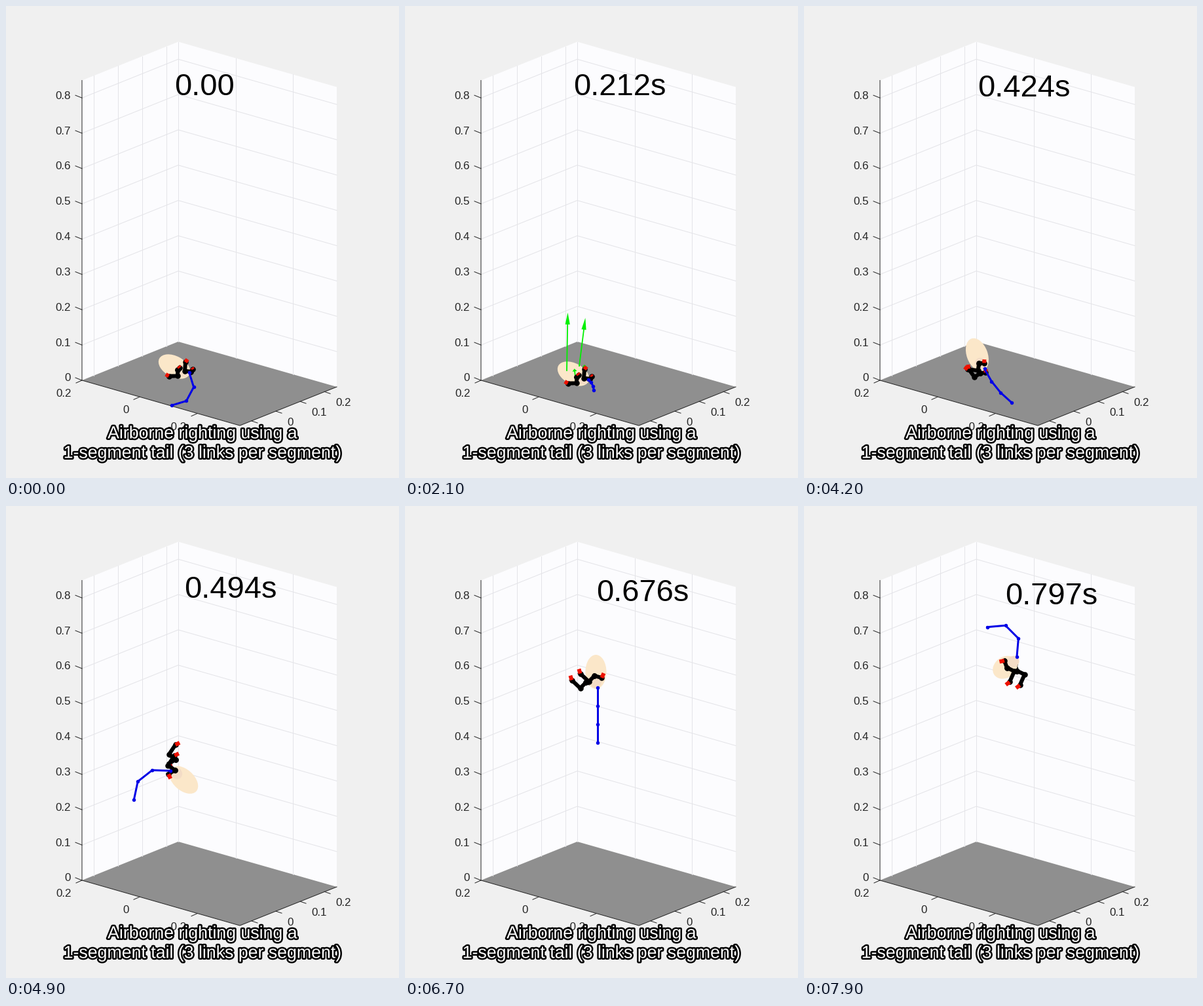
A matplotlib script for the animation above (8 s loop, 600 px wide and 720 px high).

```python
import numpy as np
import matplotlib.pyplot as plt
from matplotlib.animation import FuncAnimation
from matplotlib.patches import Ellipse, Polygon
from matplotlib.patheffects import withStroke

W, H, FRAMES, STEP = 600, 720, 80, 100
PX = 0.72  # points per pixel at 100 dpi
PAPER, WALL, FLOOR = "#f0f0f0", "#fcfcfe", "#8f8f8f"
GRID, INK = "#e4e4e8", "#262626"
TORSO, HIP = "#fbe7c9", "#f3dcc6"
BLUE, GREEN, RED = "#0000e6", "#00f000", "#ee1100"

plt.rcParams["font.family"] = "Liberation Sans"
plt.rcParams["text.kerning_factor"] = 6  # unkerned digits
fig = plt.figure(figsize=(W / 100, H / 100), dpi=100, facecolor=PAPER)
ax = fig.add_axes([0, 0, 1, 1])
ax.set(xlim=(0, W), ylim=(H, 0))
ax.axis("off")


def line(xs, ys, color, width=1, z=1, **kw):
    return ax.plot(xs, ys, color=color, lw=width * PX, zorder=z, **kw)[0]


def label(x, y, s, size=17, color=INK, **kw):
    return ax.text(x, y, s, fontsize=size * PX, color=color, **kw)


def smooth(x):
    x = np.clip(x, 0, 1)
    return x * x * (3 - 2 * x)


# ---- static scene -------------------------------------------------------

def draw_box():
    left, back, right, front = (116, 571), (263, 512), (505, 581), (357, 640)
    tall = 457.5
    for a, b in ((left, back), (back, right)):
        ax.add_patch(Polygon([a, b, (b[0], b[1] - tall), (a[0], a[1] - tall)],
                             color=WALL, lw=0, zorder=0))
    ax.add_patch(Polygon([left, back, right, front], color=FLOOR, lw=0, zorder=0.5))

    for x in (134, 171, 208, 245, 263, 351, 438):
        y = 571 - (x - 116) * 59 / 147 if x < 263 else 512 + (x - 263) * 69 / 242
        line([x, x], [y, y - tall], GRID)
    for k in range(9):
        dz = 53.85 * k
        if k:
            line([116, 263, 505], [571 - dz, 512 - dz, 581 - dz], GRID)
        line([106, 116], [567 - dz, 571 - dz], INK, z=2)
        label(99, 568 - dz, f"{k / 10:g}", ha="right", va="center")

    line([116, 116, 357, 505], [571 - tall, 571, 640, 581], INK, z=2)
    for i, s in enumerate(("0.2", "0", "-0.2")):
        x, y = 116 + 88 * i, 571 + 25.3 * i
        line([x, x - 9], [y, y + 4], INK, z=2)
        label(x - 16.5, y + 20.5, s, ha="right", va="center")
    for i, s in enumerate(("", "0", "0.1", "0.2")):
        x, y = 375 + 37 * i, 633 - 14.9 * i
        line([x, x + 9], [y, y + 3], INK, z=2)
        label(x + 17, y + 17, s, va="center")


draw_box()
for y, s in ((659.5, "Airborne righting using a"),
             (689.5, "1-segment tail (3 links per segment)")):
    label(300, y, s, 26.7, "white", ha="center", va="baseline", zorder=20,
          path_effects=[withStroke(linewidth=5 * PX, foreground="black")])

# ---- motion rules -------------------------------------------------------

LANDED, LIFTOFF = 5, 38


def drift(n):
    return np.interp(n, (38, 45, 52, 79), (0, 13, 15, 50))


def center(n):
    """Short drop, rest on the floor, then a ballistic jump."""
    drop, flight = 550 + 0.28 * n ** 2, 239 + 0.286 * (n - 74) ** 2
    return complex(257 + drift(n), min(561, drop, flight))


def heading(n):
    """Screen angle of the head, anticlockwise in degrees."""
    return np.interp(n, (37, 45, 49, 57, 65, 68, 79),
                     (152, 85, -42, -120, -270, -270, -145))


def tail_links(n):
    """Three links, each turned from the last by the same bend."""
    bend = np.interp(n, (0, 8, 36, 49, 57, 67, 79), (-45, -17, -17, 40, -13, 0, 50))
    reach = np.interp(n, (3, 11, 36, 44), (0.85, 0.28, 0.15, 1))
    return 28 * reach * np.exp(1j * np.radians(180 + bend * np.arange(1, 4)))


# Body frame: real axis to the head, imaginary axis to the belly.
TAIL_ROOT, HIP_AT = -24 - 3j, -15 + 0j
HIND = np.array([0, -11 + 6j, -3 + 22j, 3 + 26j])
FORE = np.array([0, -3 - 11j, 4 - 14j])


def legs(n):
    """Hind and fore leg on each side, crouched on the floor, swinging in flight."""
    crouch = 1 - smooth((n - LIFTOFF) / 8)
    air = np.sqrt(np.clip((n - 49) / 30, 0, 1))
    swing = 35 * crouch + (1 - crouch) * (67 * air - 35)
    hip = -7 * crouch + (1 - crouch) * (18 * air - 20) + 2j
    for side in (0, 1):
        root = hip + side * complex(-10 - 9 * crouch, 13 - 20 * crouch)
        turn = np.exp(-1j * np.radians(swing + 95 * crouch * side))
        yield root + HIND * turn * (1 - 0.25 * crouch)
        yield root + FORE * (1 - 0.6 * crouch)


# ---- moving artists -----------------------------------------------------

torso, hip = (ax.add_patch(Ellipse((0, 0), 1, 1, color=c, lw=0, zorder=z))
              for c, z in ((TORSO, 5), (HIP, 5.1)))
DEPTH = (7, 7, 7, 4)  # far fore leg lies behind the torso
limbs = [line([], [], "black", 6, z, marker="o", ms=8.5 * PX, mew=0) for z in DEPTH]
feet = [line([], [], RED, 6, z + 0.5, solid_capstyle="butt") for z in DEPTH]
tail = line([], [], BLUE, 3, 8, marker="o", ms=5.5 * PX, mew=0)
shafts = [line([], [], GREEN, 1.8, 6) for _ in range(4)]
heads = [ax.add_patch(Polygon([(0, 0)] * 3, color=GREEN, lw=0, zorder=6))
         for _ in range(4)]
clock = label(257.5, 135.5, "", 47.2, "black", va="baseline", zorder=10)


def set_path(artist, z):
    artist.set_data(z.real, z.imag)


def set_arrow(shaft, head, start, push):
    u = push / abs(push)
    tip = start + push
    neck = tip - u * min(18, 0.35 * abs(push))
    set_path(shaft, np.array([start, neck]))
    corners = np.array([tip, neck + 3.6j * u, neck - 3.6j * u])
    head.set_xy(np.column_stack([corners.real, corners.imag]))


def draw_forces(n):
    """Floor reaction: two long arrows that fade, two short ones that grow."""
    long = np.interp(n, (5, 11, 33, 38), (125, 106, 67, 115))
    short = np.interp(n, (14, 33, 38), (0, 32, 45))
    lean = 0.08 - 0.003 * n
    pushes = ((247 + 556j, long, lean), (266 + 549j, 0.83 * long, lean + 0.11),
              (260 + 565j, short, -0.12), (275 + 557j, 0.85 * short, -0.12))
    for shaft, head, (start, size, tilt) in zip(shafts, heads, pushes):
        on = LANDED <= n <= LIFTOFF and size > 4
        shaft.set_visible(on)
        head.set_visible(on)
        if on:
            set_arrow(shaft, head, start, size * (tilt - 1j))


def draw(n):
    angle, mid = heading(n), center(n)

    def place(z):
        return mid + np.conj(z * np.exp(1j * np.radians(angle)))

    hip_mid = place(HIP_AT)
    torso.set(center=(mid.real, mid.imag), height=32, angle=-angle,
              width=2 * np.interp(n, (67, 79), (26, 20)))
    hip.set(center=(hip_mid.real, hip_mid.imag), width=19, height=17, angle=-angle)

    set_path(tail, place(TAIL_ROOT + np.cumsum(np.append(0, tail_links(n)))))
    for limb, foot, leg in zip(limbs, feet, legs(n)):
        joints = place(leg)
        set_path(limb, joints[:-1])
        set_path(foot, joints[-2:])

    draw_forces(n)
    d = drift(n)
    clock.set_position((257.5 + d, 135.5 + 0.29 * d))
    clock.set_text(f"{n * 0.01009:.3g}s" if n else "0.00")
    return []


anim = FuncAnimation(fig, draw, frames=FRAMES, interval=STEP, repeat=True,
                     init_func=lambda: draw(0), blit=False)
plt.show()
```
